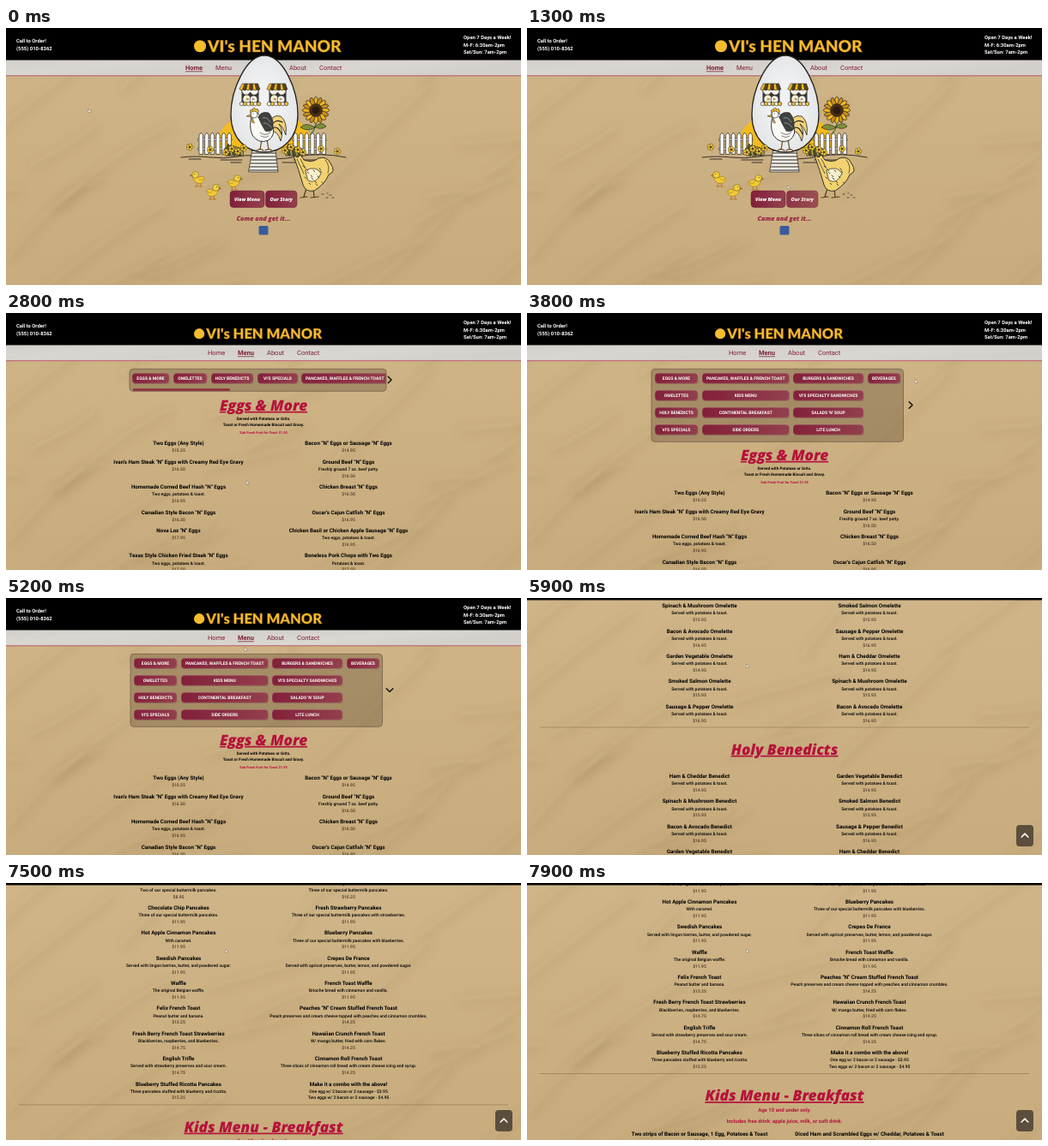
These frames come from a looping animation (600x300 px, 8 s). An HTML page with a canvas:

```html
<!DOCTYPE html>
<html lang="en">
<head>
<meta charset="utf-8">
<title>Diner menu</title>
<style>
html, body { margin: 0; width: 100%; height: 100%; overflow: hidden; background: #cbb083; }
canvas, svg { position: absolute; left: 0; top: 0; width: 600px; height: 300px; }
text { font-family: Roboto, sans-serif; font-weight: 500; text-rendering: geometricPrecision; }
.mid { text-anchor: middle; }
.bold { font-weight: 700; }
.fancy { font-family: "Open Sans", sans-serif; font-weight: 800; font-style: italic; }
.title { fill: #b5123c; text-decoration: underline; text-decoration-thickness: 1px; }
.red { fill: #b5123c; }
.dusk { fill: #96263f; }
.white { fill: #fff; }
.price { fill: #4a3623; }
.nav { fill: #7d1f33; font-weight: 400; }
.on { font-weight: 700; text-decoration: underline; }
</style>
</head>
<body>
<canvas id="paper" width="600" height="300"></canvas>
<svg id="stage" viewBox="0 0 600 300"></svg>
<script>
const LOOP = 8000, STEP = 100, FOLD = 58;
const INK = '#26231f';
const stage = document.getElementById('stage');
const range = n => [...Array(n).keys()];
const clamp = v => Math.max(0, Math.min(1, v));

// y is the middle of the capitals
const text = (x, y, s, size, cls = 'mid') =>
  `<text x="${x}" y="${y + size * .355}" font-size="${size}" class="${cls}">${s.replace(/&/g, '&amp;')}</text>`;
const path = (d, fill = 'none', w = .7, stroke = INK) =>
  `<path d="${d}" fill="${fill}" stroke="${stroke}" stroke-width="${w}" stroke-linejoin="round" stroke-linecap="round"/>`;
const oval = (x, y, rx, ry, fill, w = .6, extra = '') =>
  `<ellipse cx="${x}" cy="${y}" rx="${rx}" ry="${ry}" fill="${fill}" stroke="${INK}" stroke-width="${w}" ${extra}/>`;
const rect = (x, y, w, h, fill, r = 0, extra = '') =>
  `<rect x="${x}" y="${y}" width="${w}" height="${h}" rx="${r}" fill="${fill}" ${extra}/>`;
const group = (attrs, s) => `<g ${attrs}>${s}</g>`;

function drawPaper() {
  const c = document.getElementById('paper').getContext('2d');
  let seed = 11;
  const rnd = () => (seed = seed * 16807 % 2147483647) / 2147483647;
  const base = c.createLinearGradient(0, 0, 0, 300);
  base.addColorStop(0, '#cfb588');
  base.addColorStop(1, '#c8ac7d');
  c.fillStyle = base;
  c.fillRect(0, 0, 600, 300);
  // soft folds: a light ridge with a faint shadow under it
  for (const i of range(26)) {
    const w = 60 + rnd() * 130, bend = rnd() * 30 - 15;
    c.save();
    c.translate(rnd() * 620 - 60, 60 + rnd() * 260);
    c.rotate(-rnd() * .9);
    for (const [dy, width, blur, color] of [[4, 10, 6, 'rgba(120,88,45,.09)'], [0, 3, 2, 'rgba(255,236,196,.13)']]) {
      c.filter = `blur(${blur}px)`;
      c.strokeStyle = color;
      c.lineWidth = width;
      c.beginPath();
      c.moveTo(0, dy);
      c.quadraticCurveTo(w / 2, dy + bend, w, dy);
      c.stroke();
    }
    c.restore();
  }
}

function header(navX, active, logoSize) {
  const r = logoSize * .37;
  return rect(0, 0, 600, 38, '#000') + rect(0, 37.5, 600, 18, 'url(#bar)') +
    rect(0, 55.3, 600, .9, '#b8506a') +
    text(12, 15.3, 'Call to Order!', 5.9, 'bold white') +
    text(12, 23.7, '(555) 010-8362', 5.9, 'bold white') +
    text(533, 11, 'Open 7 Days a Week!', 5.9, 'bold white') +
    text(533, 19.6, 'M-F: 6:30am-2pm', 5.9, 'bold white') +
    text(533, 28.4, 'Sat/Sun: 7am-2pm', 5.9, 'bold white') +
    `<circle cx="${219 + r}" cy="${44 - logoSize * 1.2}" r="${r}" fill="#f5bd2e"/>` +
    `<text x="${221 + 2 * r}" y="${44 - logoSize * .84}" font-size="${logoSize}" style="font-family:Lato,sans-serif;font-weight:900" fill="#f5bd2e" stroke="#8f5a12" stroke-width=".5">VI's HEN MANOR</text>` +
    ['Home', 'Menu', 'About', 'Contact'].map((s, i) =>
      text(navX[i], 46.8, s, 7.5, 'nav' + (i === active ? ' on' : ''))).join('');
}

function button(x, y, w, label, id = '') {
  return group(id && `id="${id}"`,
    rect(x + .5, y - 5.2, w, 12, '#4d3a2a', 4, 'opacity=".35"') +
    rect(x, y - 6, w, 12, 'url(#wine)', 4, 'stroke="#b8848a" stroke-width=".4"') +
    text(x + w / 2, y, label, 5, 'mid bold white'));
}

function bigButton(x, w, label, id) {
  return group(`id="${id}"`, rect(x, 190, w, 19.5, 'url(#wine)', 4, 'stroke="#6d1b2c" stroke-width=".5"') +
    text(x + w / 2, 199.6, label, 5.7, 'mid fancy white'));
}

const chick = (x, y, flip = 1) => group(`transform="translate(${x} ${y}) scale(${.9 * flip} .9)"`,
  path('M-1 6 L-2 11 M3 6 L3 11 M-4 11 L0 11 M1 11 L5 11', 'none', .8, '#b06a14') +
  path('M-7 -1 Q-4 1 0 -1 Q8 -4 8 2 Q6 8 0 7 Q-6 6 -7 -1Z', '#f2c933', .5, '#80601a') +
  oval(-4, -4, 4.4, 4.2, '#f5d03c', .4) + path('M-8 -4 L-11 -3 L-8 -2Z', '#e08a1c', .3) +
  path('M1 1 Q4 5 7 1', 'none', .5, '#80601a') + oval(-5, -5, .5, .6, '#222', 0));

const flower = (x, y, r = 2) => range(5).map(i =>
  oval(x + r * Math.cos(i * 1.257), y + r * Math.sin(i * 1.257), r * .75, r * .75, '#f6cc35', .4)).join('') +
  oval(x, y, r * .5, r * .5, '#5a3a14', 0);

const bush = x => range(7).map(i =>
  path(`M${x + i * 3} 149 q-4 -9 0 -${9 + i * 5 % 6} q4 5 2 ${9 + i * 5 % 6}Z`, i % 2 ? '#55502f' : '#a59a52', .6)).join('');

const fence = x => path(`M${x - 1} 129 h39 v2.5 h-39Z M${x - 1} 140 h39 v2.5 h-39Z`, '#fff', .5) +
  range(6).map(i => path(`M${x + i * 6.6} 147 v-22 l2.2 -3 l2.2 3 v22Z`, '#fbfbf8', .7)).join('');

const houseWindow = x => rect(x - 10, 71, 20, 18, '#3a3734', 1) +
  path(`M${x - 10} 72 h20 q-1 7 -7 6 l-3 -3 l-3 3 q-6 1 -7 -6Z`, '#f4f2ea', .5) +
  oval(x - 4, 83, 4.6, 5, '#f6f0d4', .6) + oval(x + 4, 83.5, 4.4, 4.6, '#f6f4ea', .6) +
  path(`M${x - 4} 82 l2.4 1 l-2.4 1.2Z M${x + 3} 82 l2 1 l-2 1.2Z`, '#e9a51e', .3) +
  range(6).map(i => oval(x - 10 + i * 4, 88.5, 2.3, 2.2, i % 2 ? '#f0bd3a' : '#f3f1e8', .6)).join('') +
  range(6).map(i => path(`M${x - 9 + i * 3} 65 h3 l${(i - 2) * .9 - .4} 6.5 q-2 2.6 -4.2 0Z`,
    i % 2 ? '#57431a' : '#f5b91f', .6)).join('');

function sunflower() {
  return path('M360 104 Q364 114 355 124', 'none', 1.6, '#5d7a2c') +
    path('M360 115 Q369 108 373 115 Q366 120 360 115Z M360 116 Q349 109 343 116 Q352 122 360 116Z', '#7f8f3a', .6) +
    range(16).map(i => oval(361, 86, 2.4, 5.6, i % 2 ? '#c98f1c' : '#f4b81f', .7, `transform="rotate(${i * 22.5} 361 96)"`)).join('') +
    oval(361, 96, 7.5, 7.5, '#4a2f17') + oval(361, 96, 4.5, 4.5, '#2c1c10', 0);
}

function rooster() {
  return path('M298 130 L296 142 M304 130 L306 142 M292 143 L296 141 L300 143 M302 143 L306 141 L310 143', 'none', 1.2, '#6b4b18') +
    path('M306 114 Q309 100 320 103 Q328 109 326 125 Q322 114 318 112 Q324 120 320 132 Q316 119 310 121Z', '#f2d27a', .8) +
    path('M308 115 Q314 105 322 110 M309 118 Q316 112 321 124', 'none', 1.2) +
    path('M287 101 Q295 96 297 106 Q303 113 310 113 Q315 124 306 131 Q294 136 287 125 Q282 114 287 101Z', '#faf9f4', .9) +
    path('M294 104 Q297 97 306 99 Q312 105 311 117 Q309 122 302 120 Q297 112 294 104Z', '#3f4140', .7) +
    path('M299 105 q5 -2 9 5 M300 111 q5 -1 9 5', 'none', .6, '#c9c9c4') +
    path('M296 122 q6 5 12 0 M297 126 q5 3 9 0', 'none', .6) +
    path('M285 100 Q283 94 287 96 Q288 91 291 95 Q295 93 294 99Z', '#f0b92c', .6) +
    oval(289, 101, 4, 4, '#fff') + path('M285 101 L280 103 L285 104Z M287 105 q-2 6 2 6Z', '#eeb029', .5) +
    oval(288, 100, .6, .6, '#222', 0);
}

function hen() {
  return path('M350 187 L347 197 M358 187 L359 197 M343 198 L351 197 M355 198 L364 197', 'none', 1.2, '#4f3a14') +
    path('M335 149 L340 151 L343 148 L347 154 Q357 158 364 152 Q374 149 378 158 Q385 168 376 171 Q372 182 359 190 Q349 192 346 183 Q341 165 335 149Z', '#f2d271', .9) +
    path('M349 166 Q362 160 367 170 Q361 183 352 178Z', '#faf0cb', .7) +
    range(14).map(i => path(`M${346 + i * 5 % 23} ${161 + i * 7 % 22} l1.8 1.6`, 'none', .8)).join('') +
    path('M339 153 L347 170 M343 153 L349 164 M372 154 Q378 161 375 169', 'none', .7);
}

function hero() {
  const seeds = path('M368 194 h2 M373 198 h2 M377 195 h2 M374 193 h1 M380 198 h2', 'none', .7);
  return path('M243 142 Q248 116 264 107 L338 107 Q354 116 359 142Z', '#f5bb1d', 0) +
    fence(225) + fence(335) +
    path('M204 151 Q222 149 238 151 T270 150 T300 151 T340 150 T396 151 M213 153 h14 M250 154 h25 M335 154 h30 M262 157 h12 M322 157 h20', 'none', .9) +
    path('M287 143 L314 143 L317 168 L283 168Z', '#f3f1e8') +
    range(6).map(i => path(`M${287 - i * .6} ${146 + i * 4} H${314 + i * .5}`, 'none', 1.1)).join('') +
    path('M301 32 C323 32 340 72 340 101 C340 129 322 145 301 145 C280 145 262 129 262 101 C262 72 280 32 301 32Z', 'url(#shell)', 1.3) +
    houseWindow(284.5) + houseWindow(316.5) + bush(256) + bush(326) +
    [214, 238, 256, 263, 270, 277, 325, 332, 340, 346, 367, 386].map((x, i) => flower(x, 139 + i * 3 % 7, 2.3)).join('') +
    sunflower() + rooster() + hen() + seeds + chick(224, 175) + chick(241, 190, -1) + chick(266, 179, -1);
}

function home() {
  return header([209, 244, 330, 365], 0, 19) + hero() +
    bigButton(261, 40, 'View Menu', 'view') + bigButton(302.5, 36.5, 'Our Story', 'story') +
    text(300, 222.5, 'Come and get it...', 7.3, 'mid fancy dusk') + rect(294.5, 231, 11, 10.5, '#3a5a9b', 1.5);
}

const PANEL = 'stroke="#75604a" stroke-width=".8"';
const COLUMNS = [
  [149, 50, ['EGGS & MORE', 'OMELETTES', 'HOLY BENEDICTS', "VI'S SPECIALS"]],
  [204, 101.5, ['PANCAKES, WAFFLES & FRENCH TOAST', 'KIDS MENU', 'CONTINENTAL BREAKFAST', 'SIDE ORDERS']],
  [310, 82, ['BURGERS & SANDWICHES', "VI'S SPECIALTY SANDWICHES", "SALADS 'N' SOUP", 'LITE LUNCH']],
  [397, 38, ['BEVERAGES']]
];
const openPanel = () => rect(145, 65.3, 293.5, 85, 'rgba(90,68,45,.34)', 4, PANEL) +
  COLUMNS.map(([x, w, names]) => names.map((s, i) => button(x, 76.2 + i * 20, w, s, s[0] === 'P' ? 'pick' : '')).join('')).join('');

function closedPanel() {
  const row = [[151, 43], [199, 39], [243, 49], [297, 47], [348, 101.5]];
  const names = [...COLUMNS[0][2], COLUMNS[1][2][0]];
  return rect(148, 65.3, 299, 26, 'rgba(90,68,45,.34)', 4, PANEL) +
    group('clip-path="url(#strip)"', row.map(([x, w], i) => button(x, 76.2, w, names[i])).join('')) +
    rect(152, 88.2, 113, 2.6, '#8a2c3c', 1);
}

const EGGS = [
  ['Two Eggs (Any Style)||$10.25', 'Bacon "N" Eggs or Sausage "N" Eggs||$14.95'],
  ['Ivan\'s Ham Steak "N" Eggs with Creamy Red Eye Gravy||$16.50', 'Ground Beef "N" Eggs|Freshly ground 7 oz. beef patty.|$16.50'],
  ['Homemade Corned Beef Hash "N" Eggs|Two eggs, potatoes & toast.|$16.95', 'Chicken Breast "N" Eggs||$16.50'],
  ['Canadian Style Bacon "N" Eggs||$16.50', 'Oscar\'s Cajun Catfish "N" Eggs||$16.95'],
  ['Nova Lox "N" Eggs||$17.95', 'Chicken Basil or Chicken Apple Sausage "N" Eggs|Two eggs, potatoes & toast.|$16.95'],
  ['Texas Style Chicken Fried Steak "N" Eggs|Two eggs, potatoes & toast.|$17.50', 'Boneless Pork Chops with Two Eggs|Potatoes & toast.|$17.50']
];
const CAKES = [
  ['Short Stack|Two of our special buttermilk pancakes.|$8.95', 'Sky Stack|Three of our special buttermilk pancakes.|$10.25'],
  ['Chocolate Chip Pancakes|Three of our special buttermilk pancakes.|$11.95', 'Fresh Strawberry Pancakes|Three of our special buttermilk pancakes with strawberries.|$11.95'],
  ['Hot Apple Cinnamon Pancakes|With caramel.|$11.95', 'Blueberry Pancakes|Three of our special buttermilk pancakes with blueberries.|$11.95'],
  ['Swedish Pancakes|Served with lingon berries, butter, and powdered sugar.|$11.95', 'Crepes De France|Served with apricot preserves, butter, lemon, and powdered sugar.|$11.95'],
  ['Waffle|The original Belgian waffle.|$11.95', 'French Toast Waffle|Brioche bread with cinnamon and vanilla.|$11.95'],
  ['Felix French Toast|Peanut butter and banana.|$13.25', 'Peaches "N" Cream Stuffed French Toast|Peach preserves and cream cheese topped with peaches and cinnamon crumbles.|$14.25'],
  ['Fresh Berry French Toast Strawberries|Blackberries, raspberries, and blueberries.|$14.75', 'Hawaiian Crunch French Toast|W/ mango butter, fried with corn flakes.|$14.25'],
  ['English Trifle|Served with strawberry preserves and sour cream.|$14.75', 'Cinnamon Roll French Toast|Three slices of cinnamon roll bread with cream cheese icing and syrup.|$14.25'],
  ['Blueberry Stuffed Ricotta Pancakes|Three pancakes stuffed with blueberry and ricotta.|$15.25', 'Make it a combo with the above!|One egg w/ 2 bacon or 2 sausage - $3.95|Two eggs w/ 2 bacon or 2 sausage - $4.95']
];
const KIDS = [['Two strips of Bacon or Sausage, 1 Egg, Potatoes & Toast||$8.95', 'Diced Ham and Scrambled Eggs w/ Cheddar, Potatoes & Toast||$8.95']];
const FILLINGS = ['Ham & Cheddar', 'Spinach & Mushroom', 'Bacon & Avocado', 'Garden Vegetable', 'Smoked Salmon', 'Sausage & Pepper'];
const plates = kind => FILLINGS.map((s, i) => [s, FILLINGS[(i + 3) % 6]].map(n =>
  `${n} ${kind}|Served with potatoes & toast.|$${14 + i % 3}.95`));

let y = 166;
const tops = {};
function section(title, notes, first, rows) {
  tops[title] = y;
  let out = text(300, y - .3, title, 17.2, 'mid fancy title');
  for (const [dy, s, size, cls] of notes) out += text(300, y + dy, s, size, 'mid bold ' + cls);
  y += first;
  let step = 0;
  for (const row of rows) {
    y += step;
    row.forEach((item, col) => {
      const [name, ...rest] = item.split('|'), x = col ? 399 : 201;
      out += text(x, y, name, 6.25, 'mid bold');
      rest.filter(Boolean).forEach((s, i) =>
        out += text(x, y + 8.7 + i * 7.7, s, 5, s[0] === '$' ? 'mid price' : 'mid'));
    });
    step = row.some(s => s.split('|')[1]) ? 29.35 : 21.6;
  }
  out += rect(15, y + 24.3, 570, .6, '#8d7652');
  y += 50.5;
  return out;
}

function menu() {
  return section('Eggs & More', [
    [15, 'Served with Potatoes or Grits.', 4.7, ''],
    [22.5, 'Toast or Fresh Homemade Biscuit and Gravy.', 4.7, ''],
    [32, 'Sub Fresh Fruit for Toast $1.95', 4, 'red']], 44, EGGS) +
    section('Omelettes', [], 31, plates('Omelette')) +
    section('Holy Benedicts', [], 31, plates('Benedict')) +
    section("Vi's Specials", [], 31, plates('Scramble')) +
    section("Pancakes, Waffles 'N' French Toast", [[15.7, 'Egg whites upon request $1.25', 6.25, 'red']], 31, CAKES) +
    section('Kids Menu - Breakfast', [
      [16.5, 'Age 10 and under only.', 6, 'red'],
      [29, 'Includes free drink: apple juice, milk, or soft drink.', 6, 'red']], 44.5, KIDS);
}

const stops = (...c) => c.map((s, i) => `<stop offset="${i / (c.length - 1)}" stop-color="${s}"/>`).join('');
stage.innerHTML = `<defs>
  <linearGradient id="bar" x2="1" y2=".3">${stops('#d3d0cb', '#d9d6d1', '#d4d1cc', '#dad7d3', '#d3d0cb')}</linearGradient>
  <linearGradient id="wine">${stops('#82203a', '#93404c')}</linearGradient>
  <radialGradient id="shell">${stops('#f1f2f3', '#eff0f1', '#e4e6e8')}</radialGradient>
  <clipPath id="strip"><rect x="148.5" y="66" width="298" height="25"/></clipPath></defs>` +
  rect(0, 0, 600, 300, '#c9ad50', 0, 'id="tint"') +
  group('id="home"', home()) +
  group('id="menu"', header([235, 270, 304, 339], 1, 16.5) +
    group('id="closed"', closedPanel()) + group('id="open"', openPanel()) +
    group('id="arrow"', path('M-1.8 -3.8 L2 0 L-1.8 3.8', 'none', 1.5, '#15110d')) +
    group('id="list"', menu())) +
  group('id="up"', rect(570, 265, 20, 25, '#5c4e3d', 4) + path('M576.2 279 L580 275 L583.8 279', 'none', 1.6, '#fff')) +
  rect(0, 0, 600, 2.5, '#000') +
  group('id="mouse"', path('M-1 -2 V2 L.2 1.1 L1 2.4 L1.6 2 L1 .9 H2.2Z', '#fff', .5, '#77706a'));

const el = {};
stage.querySelectorAll('g[id], #tint').forEach(n => el[n.id] = n);
const show = (n, on) => n.style.display = on ? '' : 'none';
const move = (n, s) => n.setAttribute('transform', s);

const CAKES_TOP = tops["Pancakes, Waffles 'N' French Toast"] - 14;
const MOUSE = [[0, 97, 97], [200, 110, 96], [600, 235, 154], [900, 306, 114], [1200, 316, 180], [1500, 281, 198],
  [2800, 281, 198], [3600, 453, 80], [4600, 453, 80], [4800, 385, 112], [4900, 320, 116], [5100, 283, 51],
  [5200, 279, 60], [5500, 256.5, 79.5], [LOOP, 256.5, 79.5]];

function mouseAt(t) {
  const i = MOUSE.findIndex(k => k[0] > t), [t0, x0, y0] = MOUSE[i - 1], [t1, x1, y1] = MOUSE[i];
  const u = (t - t0) / (t1 - t0);
  return [x0 + (x1 - x0) * u, y0 + (y1 - y0) * u];
}

function scrollAt(t) {
  const u = clamp((t - 5500) / 900), jump = u * u * (3 - 2 * u);
  const creep = clamp((t - 6500) / 1000);
  return CAKES_TOP * jump + 45.5 * creep * creep + Math.max(0, t - 7500) * .091;
}

function render(t) {
  const onMenu = t >= 1900, ready = t >= 2400, open = t >= 3800, scroll = scrollAt(t);
  show(el.tint, onMenu && !ready);
  show(el.home, !onMenu);
  show(el.menu, onMenu);
  show(el.closed, !open);
  show(el.open, open);
  show(el.arrow, ready);
  move(el.menu, `translate(0 ${-scroll})`);
  move(el.closed, `translate(${ready ? -4 : 0} 0)`);
  move(el.list, `translate(0 ${open ? 0 : -FOLD})`);
  move(el.arrow, `translate(447 ${open ? 107.5 : 78}) rotate(${90 * clamp((t - 3800) / 300)})`);
  move(el.view, t >= 1400 ? 'translate(281 199.7) scale(1.08) translate(-281 -199.7)' : '');
  el.story.style.opacity = t >= 1200 && t < 1400 ? .85 : 1;
  el.pick.style.opacity = t >= 5300 ? .85 : 1;
  el.up.style.opacity = clamp((scroll - 60) / 200);
  move(el.mouse, `translate(${mouseAt(t)})`);
}

drawPaper();
render(0);
const start = performance.now();
(function tick() {
  const t = (performance.now() - start) % LOOP;
  render(Math.floor(t / STEP) * STEP);
  requestAnimationFrame(tick);
})();
</script>
</body>
</html>
```
